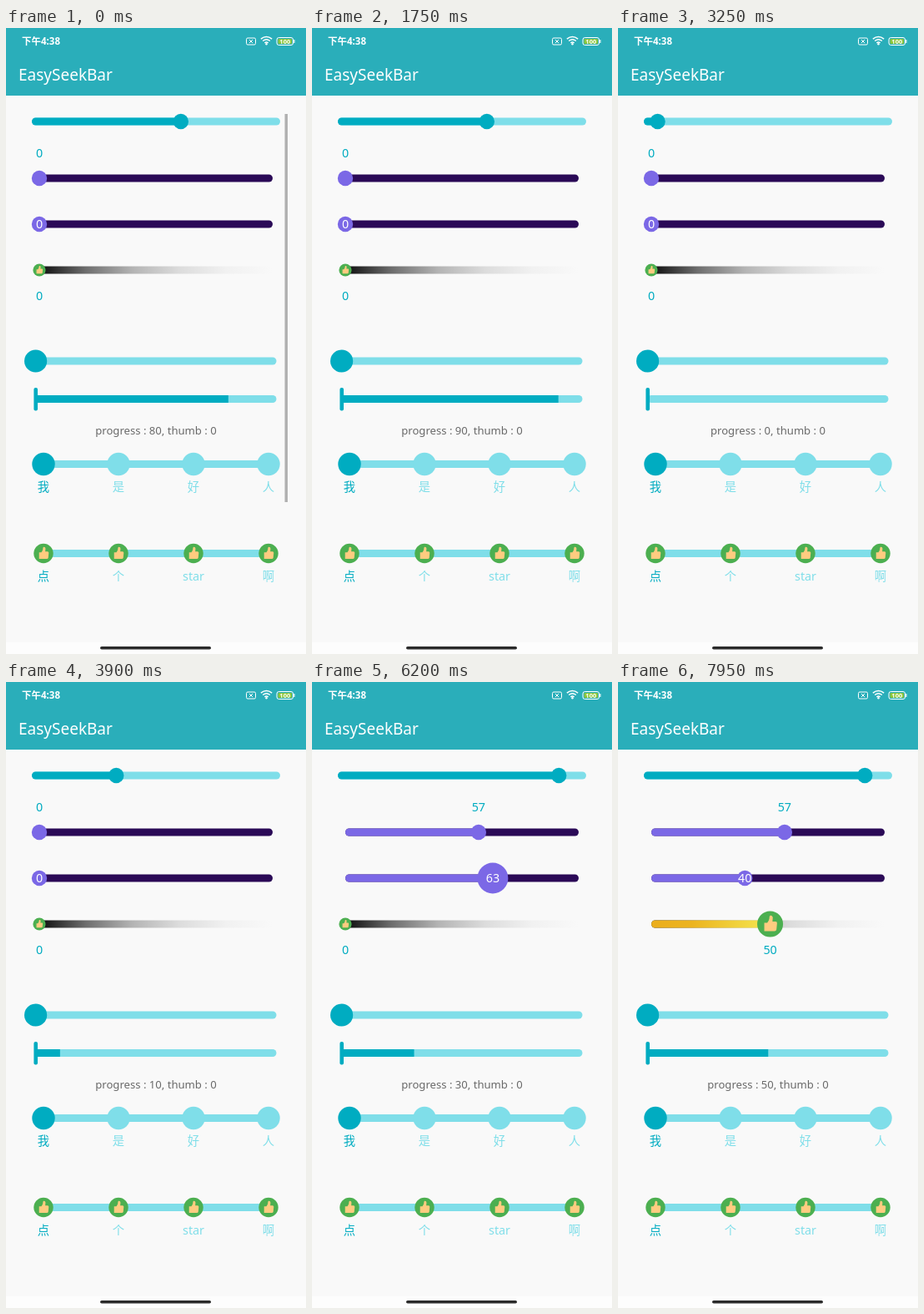
Recreate the animation shown at these times as an HTML page. Size 360 px wide and 750 px high, loop 8000 ms.

```html
<!DOCTYPE html>
<html lang="zh-CN">
<head>
<meta charset="utf-8">
<title>EasySeekBar</title>
<style>
  html, body { margin: 0; width: 100%; height: 100%; overflow: hidden; background: #f9f9f9; }
  svg { display: block; width: 360px; height: 750px; }
  text { font-family: "Noto Sans", "Noto Sans CJK SC", sans-serif; }
</style>
</head>
<body>
<svg viewBox="0 0 360 750">
  <defs>
    <linearGradient id="gray" gradientUnits="userSpaceOnUse" x1="40" x2="320">
      <stop stop-color="#0c0c0c"/>
      <stop offset=".2" stop-color="#6e6e6e"/>
      <stop offset=".4" stop-color="#b4b4b4"/>
      <stop offset=".6" stop-color="#dcdcdc"/>
      <stop offset=".8" stop-color="#f1f1f1"/>
      <stop offset="1" stop-color="#f9f9f9"/>
    </linearGradient>
    <linearGradient id="gold" gradientUnits="userSpaceOnUse" x1="40" x2="180">
      <stop stop-color="#ebae1c"/>
      <stop offset=".35" stop-color="#ecb420"/>
      <stop offset="1" stop-color="#f4e650"/>
    </linearGradient>
    <g id="like">
      <circle r="15.5" fill="#4caf50"/>
      <path fill="#ffcc80" d="M-7-1.5H-3.5C-1.5-4-.8-6-.8-8.5C-.6-11 3-10.6 3.2-7.5L2.8-3H6.5Q8.5-3 8.3-1L7.6 6.5Q7.3 8.5 5.3 8.5H-7Z"/>
    </g>
  </defs>
  <g id="base"></g>
  <g id="live"></g>
</svg>
<script>
const LOOP = 8000;
const TEAL = '#00acc1', PALE = '#7fdee9', PURPLE = '#7b68e6', INDIGO = '#2b0a57';
const base = document.getElementById('base'), live = document.getElementById('live');

const line = (x1, x2, y, color, cap = 'round') =>
  `<path d="M${x1} ${y}H${x2}" stroke="${color}" stroke-width="9" stroke-linecap="${cap}"/>`;
const dot = (x, y, r, color) => `<circle cx="${x}" cy="${y}" r="${r}" fill="${color}"/>`;
const box = (x, y, w, h, color, r = 0) =>
  `<rect x="${x}" y="${y}" width="${w}" height="${h}" rx="${r}" fill="${color}"/>`;
const label = (x, y, text, color, size = 14.3, anchor = 'middle', weight = 400) =>
  `<text x="${x}" y="${y + size * .36}" fill="${color}" font-size="${size}" text-anchor="${anchor}" font-weight="${weight}">${text}</text>`;
const like = (x, y, r) => `<use href="#like" transform="translate(${x} ${y}) scale(${r / 15.5})"/>`;

// Eased value at time t along [time, value] points.
function follow(t, points) {
  let [t0, v0] = points[0];
  for (const [t1, v1] of points) {
    if (t < t1) {
      const u = Math.max(0, (t - t0) / (t1 - t0));
      return v0 + (v1 - v0) * u * u * (3 - 2 * u);
    }
    [t0, v0] = [t1, v1];
  }
  return v0;
}

function steps(y, names, thumb) {
  return line(45, 315, y, PALE) + names.map((name, i) => {
    const x = 45 + i * 90, color = i ? PALE : TEAL;
    return thumb(x, color) + label(x, y + 27, name, color);
  }).join('');
}

function statusBar() {
  const cx = 312.5, cy = 20;
  const arc = r => `M${cx - r * .7} ${cy - r * .72}Q${cx} ${cy - r * 1.28} ${cx + r * .7} ${cy - r * .72}`;
  return label(19, 16, '下午4:38', '#fff', 11.5, 'start', 600) +
    `<g fill="none" stroke="#fff">
      <rect x="288.5" y="12" width="11" height="8" rx="1.5"/>
      <path d="M292 14l4 4m0-4l-4 4"/>
      <path d="${arc(9.5)}${arc(6.2)}${arc(3)}" stroke-width="1.5"/>
      <rect x="325" y="11.5" width="19.5" height="9" rx="2.5"/>
    </g>` + dot(cx, cy - .8, 1.2, '#fff') + box(326.5, 13, 16.5, 6, '#8cc63a', 1) +
    box(345.3, 14, 1.2, 4, '#fff', .5) + label(334.8, 16, '100', '#fff', 7.5, 'middle', 700);
}

base.innerHTML =
  box(0, 0, 360, 750, '#f9f9f9') + box(0, 736, 360, 14, '#fdfdfd') +
  box(0, 0, 360, 81, '#2aaeba') + statusBar() +
  label(15, 56, 'EasySeekBar', '#fff', 19, 'start', 500) +
  box(113, 741, 133, 3.6, '#2b2b2b', 1.8) +
  line(35.5, 320, 399, PALE) + dot(35.6, 399, 13.6, TEAL) +
  steps(522.5, ['我', '是', '好', '人'], (x, color) => dot(x, 522.5, 13.7, color)) +
  steps(629.5, ['点', '个', 'star', '啊'], x => like(x, 629.5, 11.7));

// A bar between x = 40 and 320 whose thumb grows while pressed.
function dragBar(t, y, points, release, back, front, thumb) {
  const value = follow(t, points), x = 40 + 2.8 * value;
  const pressed = t >= points[0][0] && t < release;
  return line(44.5, 315.5, y, back) +
    (value > 2 ? line(44.5, Math.max(44.5, x - 4), y, front) : '') +
    thumb(x, y, Math.floor(value), pressed);
}

function draw(t) {
  const first = 31 + 2.98 * follow(t, [[1850, 60], [3400, 4.1], [3635, 4.1], [4300, 89]]);
  const progress = (80 + 10 * Math.floor((t - 740) / 1012 + 1)) % 110;
  const full = progress === 100;
  const fade = 1 - follow(t, [[250, 0], [500, 1]]);

  live.innerHTML =
    `<g opacity="${fade}">${box(334.5, 103, 3.5, 465, '#b1b1b1')}</g>` +
    line(35.5, 324.5, 112, PALE) + line(35.5, Math.max(35.5, first), 112, TEAL) + dot(first, 112, 9.2, TEAL) +

    dragBar(t, 180, [[4800, 0], [5200, 66], [5450, 57.1]], 5500, INDIGO, PURPLE,
      (x, y, value, pressed) => dot(x, y, pressed ? 18.5 : 9.2, PURPLE) + label(x, 149.5, value, TEAL)) +

    dragBar(t, 235, [[5850, 0], [6400, 90], [7050, 32], [7250, 40.1]], 7300, INDIGO, PURPLE,
      (x, y, value, pressed) => dot(x, y, pressed ? 18.5 : 9.2, PURPLE) + label(x, y, value, '#fff')) +

    dragBar(t, 290, [[7700, 0], [8124, 80]], LOOP, 'url(#gray)', 'url(#gold)',
      (x, y, value, pressed) => like(x, y, pressed ? 15.5 : 7.6) + label(x, 321, value, TEAL)) +

    line(40, 320, 444.5, PALE) +
    (full ? line(40, 320, 444.5, TEAL) : line(36, 36 + 2.885 * progress, 444.5, TEAL, 'butt')) +
    box(33.4, 431, 4.6, 27.5, TEAL, 2) +
    label(180, 482, `progress : ${progress}, thumb : 0`, '#696969', 13.1);
}

function tick(now) {
  draw(now % LOOP);
  requestAnimationFrame(tick);
}
draw(0);
requestAnimationFrame(tick);
</script>
</body>
</html>
```
